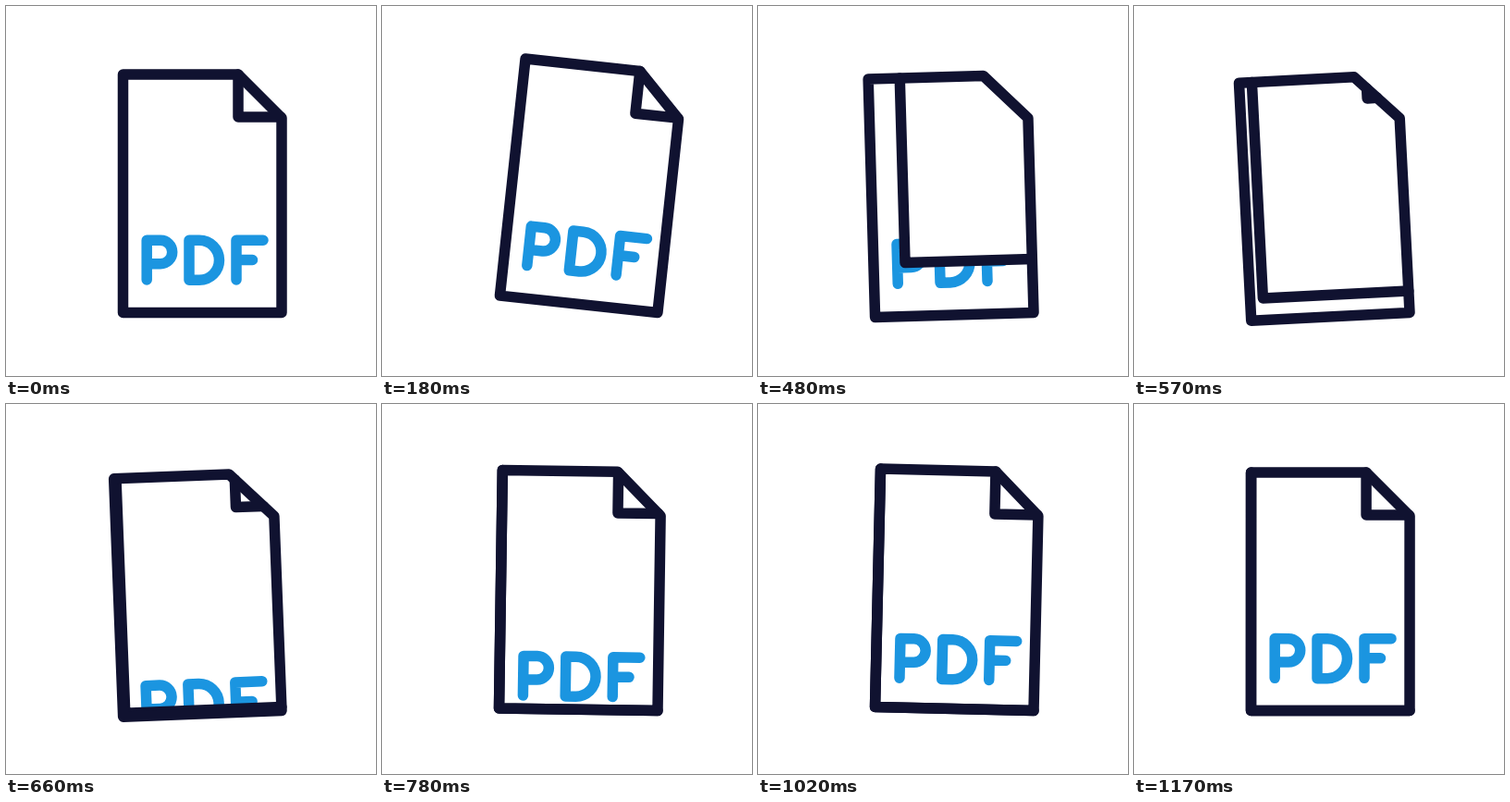
An HTML page with a canvas that plays this animation: 400x400 px, repeating every 1200 ms.

```html
<!DOCTYPE html>
<html lang="en">
<head>
<meta charset="utf-8">
<title>PDF page turn</title>
<style>
  html, body { margin: 0; height: 100%; overflow: hidden; background: #fff; }
  canvas { display: block; width: 100vmin; height: 100vmin; }
</style>
</head>
<body>
<canvas width="400" height="400"></canvas>
<script>
const ctx = document.querySelector('canvas').getContext('2d');
const LOOP = 1200, STEP = 30;
const NAVY = '#101230', BLUE = '#1b95e0';
const LEFT = 126.5, TOP = 74, RIGHT = 298, BOTTOM = 331.5;
const CUT = 177; // the cut corner lies on y = x - CUT
const REST = [251, 120], START = [268.1, 91.1], END = [LEFT, BOTTOM];

const page = new Path2D(`M${LEFT} ${TOP}H251L${RIGHT} 121V${BOTTOM}H${LEFT}Z`);
const letters = new Path2D(
  'M152.2 296V253.3H167a12.7 12.7 0 0 1 0 25.4H152.2' +
  'M198 253.3H209a21.5 21.5 0 0 1 0 43H198Z' +
  'M249 296V253.3H278M249 274.5H266.5');

// Page tilt: [time, degrees]
const tilt = [[0, 0], [252, 7.2], [565, -2.95], [895, 2], [LOOP, 0]];

const clamp = u => Math.min(1, Math.max(0, u));
const progress = (t, from, to) => clamp((t - from) / (to - from));
const smooth = u => u * u * (3 - 2 * u);
const smoother = u => u * u * u * (10 + u * (6 * u - 15));
const between = (a, b, u) => a.map((v, i) => v + (b[i] - v) * u);

function tiltAt(t) {
  const i = tilt.findIndex(key => key[0] > t);
  const [t0, a] = tilt[i - 1], [t1, b] = tilt[i];
  return a + (b - a) * smoother(progress(t, t0, t1));
}

function riseAt(t) {
  const k = 3.8, tail = Math.exp(-k);
  return 80 * (Math.exp(-k * progress(t, 570, LOOP)) - tail) / (1 - tail);
}

function stroke(path, color) {
  ctx.strokeStyle = color;
  ctx.stroke(path);
}

function drawText(dy) {
  ctx.save();
  ctx.translate(0, dy);
  stroke(letters, BLUE);
  ctx.restore();
}

function drawFold([x, y]) {
  const top = Math.max(TOP, x - CUT), right = Math.min(RIGHT, y + CUT);
  stroke(new Path2D(`M${x} ${top}V${y}H${right}`), NAVY);
}

function draw(t) {
  const turn = smooth(progress(t, 190, 720) ** 0.7);
  const grow = 1 - (1 - progress(t, 530, 850)) ** 2;
  const peel = between(REST, END, turn);

  ctx.fillStyle = '#fff';
  ctx.fillRect(0, 0, 400, 400);
  ctx.save();
  ctx.translate(RIGHT, 331);
  ctx.rotate(tiltAt(t) * Math.PI / 180);
  ctx.translate(-RIGHT, -331);
  ctx.lineWidth = 11.5;
  ctx.lineCap = ctx.lineJoin = 'round';

  drawText(0);

  // The peeled area uncovers the next sheet
  ctx.save();
  ctx.beginPath();
  ctx.rect(peel[0], TOP, RIGHT - peel[0], peel[1] - TOP);
  ctx.clip();
  ctx.fill();
  if (t >= 570) drawText(riseAt(t));
  ctx.restore();

  drawFold(peel);
  if (grow > 0) drawFold(between(START, REST, grow));
  stroke(page, NAVY);
  ctx.restore();
}

function tick() {
  const t = performance.now() % LOOP;
  draw(Math.floor(t / STEP) * STEP);
  requestAnimationFrame(tick);
}
tick();
</script>
</body>
</html>
```
